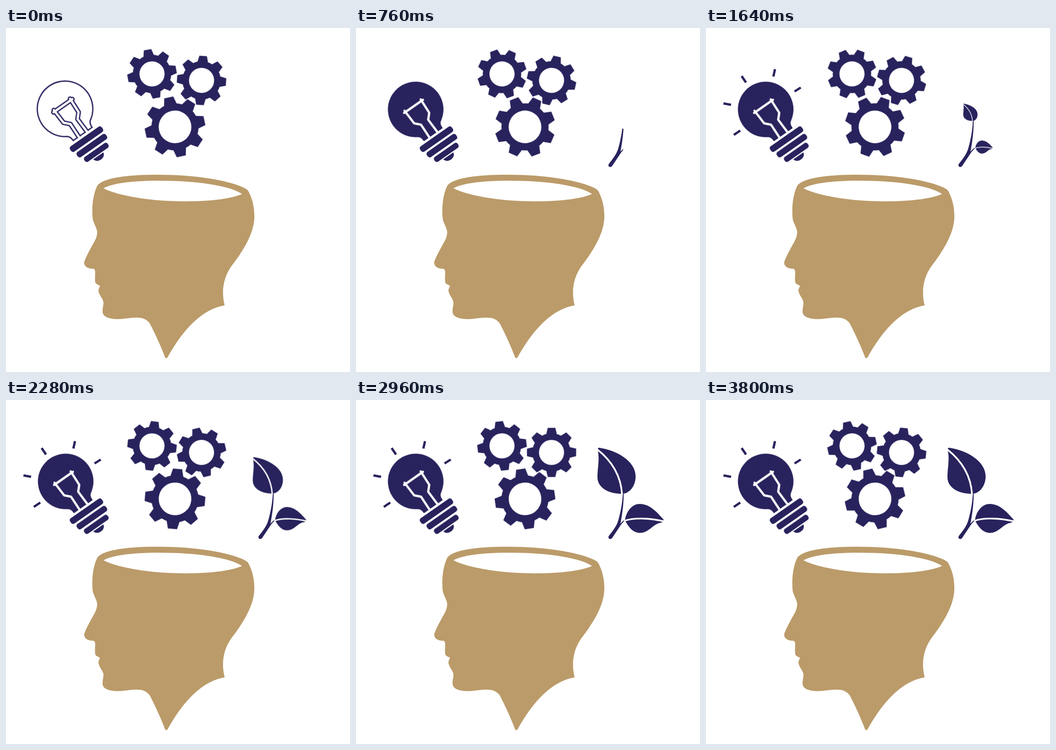
These frames come from a looping animation (748 by 748 pixels, 3840 ms). An HTML page without scripts:

```html
<!DOCTYPE html>
<html lang="en">
<head>
<meta charset="utf-8">
<title>Thinking head</title>
<style>
  @property --lit { syntax: "<number>"; inherits: true; initial-value: 0; }

  html, body { margin: 0; width: 100%; height: 100%; overflow: hidden; background: #fff; }
  svg { display: block; width: 100%; height: 100%; --navy: #28235d; --gold: #bb9b69; }

  .navy { fill: var(--navy); }
  .gold { fill: var(--gold); }
  .line { fill: none; stroke: var(--navy); }
  .white { fill: none; stroke: #fff; }

  .gear, .lit, .outline, .rays, .leaf, .draw {
    animation: 3840ms linear infinite;
  }

  .gear { animation-name: turn; animation-timing-function: steps(96); }
  .back { animation-direction: reverse; animation-timing-function: steps(96, start); }
  @keyframes turn { from { transform: rotate(0deg); } to { transform: rotate(180deg); } }

  .lit { animation-name: light; }
  .outline { animation-name: dim; }
  @keyframes light { 0%, 3.1% { opacity: 0; } 12.5%, 100% { opacity: 1; } }
  @keyframes dim { 0%, 3.1% { opacity: 1; } 12.5%, 100% { opacity: 0; } }

  /* rays switch on one after another */
  .rays { animation-name: rays; }
  .rays path { opacity: calc(var(--lit) - var(--i)); }
  @keyframes rays {
    0% { --lit: 0; }
    25% { --lit: 0; animation-timing-function: steps(5); }
    40.625%, 100% { --lit: 5; }
  }

  .draw { stroke-dasharray: 1 2; }
  .stem { animation-name: stem; }
  .twig { animation-name: twig; }
  @keyframes stem { 0% { stroke-dashoffset: 1; } 25%, 100% { stroke-dashoffset: 0; } }
  @keyframes twig { 0%, 20% { stroke-dashoffset: 1; } 25%, 100% { stroke-dashoffset: 0; } }

  .low { animation-name: low; transform-origin: 586px 260px; }
  .high { animation-name: high; transform-origin: 580px 201px; }
  @keyframes low { 0%, 21.3% { transform: scale(0); } 68.75%, 100% { transform: scale(1); } }
  @keyframes high {
    0%, 29.2% { transform: scale(0); }
    42.7% { transform: scale(.375); }
    59.4% { transform: scale(.79); }
    68.2%, 100% { transform: scale(1); }
  }
</style>
</head>
<body>
<svg viewBox="0 0 748 748">
  <defs>
    <path id="tooth" d="M-14 -49 L-10 -65.4 H10 L14 -49Z"/>
    <g id="pair"><use href="#tooth"/><use href="#tooth" transform="rotate(180)"/></g>
    <g id="cross"><use href="#pair"/><use href="#pair" transform="rotate(90)"/></g>
    <g id="gear" class="navy">
      <circle r="43.3" class="line" stroke-width="15.6"/>
      <use href="#cross"/>
      <use href="#cross" transform="rotate(45)"/>
    </g>
    <g id="small-gear" transform="scale(.817)">
      <use href="#gear"/>
      <circle r="36" class="line" stroke-width="5.2"/>
    </g>

    <path id="glass" d="M-25 67 C-25 60 -26 55 -31 52 A60.4 60.4 0 1 1 31 52 C26 55 25 60 25 67Z"/>
    <path id="filament" stroke-linecap="round" stroke-linejoin="round"
      d="M-10.5 69 L-9.5 34 L-20 23 L-21.5 -11.5 M10.5 69 L9.5 34 L20 23 L21.5 -11.5 M-25 -8 H25"/>

    <mask id="growth" maskUnits="userSpaceOnUse" x="530" y="180" width="80" height="130">
      <path class="white draw stem" pathLength="1" stroke-width="15"
        d="M547 305 C562 287 569 277 574 261 C580 240 581 217 581 194"/>
      <path class="white draw twig" pathLength="1" stroke-width="12" d="M573 271 L591 257"/>
    </mask>
  </defs>

  <!-- head -->
  <path class="gold" fill-rule="evenodd" d="M198 344 C204 333 233 319 330 319 C425 319 497 335 522 350
    C526 352 528 356 530 361 C537 376 540 392 540 410 C540 450 510 492 490 518
    C474 541 467 570 475.500 603 C428 611 386 653 350.500 717.500 H346.500 C338 695 325 666 313 643
    C307 634 298 630 288 630 C272 629 260 633 243 633 C225 633 210 628 210 617
    C210 607 212 603 212 597 C211 588 202 581 201 571 C201 566 204 564 204 560
    C199 558 195 556 194 553 C193 545 194 535 194 530 C193 525 192 523.500 189 523.500
    C178 523 170 519 170 510 C172 500 187 474 193 463 C197 456 199 447 198 441
    C195 430 190 423 188.500 415 C186 390 189 363 198 344Z
    M212 348.500 C228 338 275 332 332 332 C420 332 490 344 513 361
    C490 372 440 377 390 377 C300 377 235 361 212 348.500Z"/>

  <!-- gears -->
  <g transform="translate(317.5 99.8) rotate(-10.5)"><g class="gear"><use href="#small-gear"/></g></g>
  <g transform="translate(425.2 114) rotate(3.75)"><g class="gear back"><use href="#small-gear"/></g></g>
  <g transform="translate(367.5 215) rotate(-12)"><g class="gear"><use href="#gear"/></g></g>

  <!-- bulb -->
  <g class="outline" transform="translate(128.3 175.6) rotate(-35)">
    <use href="#glass" class="line" stroke-width="2.8"/>
    <use href="#filament" class="line" stroke-width="10.4"/>
    <use href="#filament" class="white" stroke-width="4.8"/>
    <path class="white" stroke-width="6" d="M-30 71.500 H30"/>
  </g>
  <g transform="translate(129.7 177) rotate(-35)">
    <g class="lit">
      <use href="#glass" class="navy"/>
      <use href="#filament" class="white" stroke-width="4.8"/>
    </g>
    <g class="navy">
      <rect x="-42" y="72" width="84" height="14" rx="5"/>
      <rect x="-37" y="90.5" width="77" height="13.500" rx="5"/>
      <rect x="-30" y="108.5" width="62" height="12.500" rx="5"/>
      <path d="M-13 123.500 H13.500 C12 136.500 -11 136.500 -13 123.500Z"/>
    </g>
  </g>
  <g class="rays line" stroke-width="5">
    <path style="--i:0" d="M192.500 138 L206 129.500"/>
    <path style="--i:1" d="M146.500 105.500 L150 89.500"/>
    <path style="--i:2" d="M77.500 104.500 L87 118.500"/>
    <path style="--i:3" d="M38 164 L54.500 167"/>
    <path style="--i:4" d="M60.500 232.500 L74.500 223"/>
  </g>

  <!-- plant -->
  <path class="navy" mask="url(#growth)" d="M549.500 296 C558 285 567 274 570.500 261 C577 238 580 217 580.500 196
    H581.800 C583 222 579 248 575 269 C579 264 584 260 588 259
    C583 263 577 269 573 276 L557 300 C553 305 547 301 549.500 296Z"/>
  <g class="leaf low">
    <path class="navy" d="M585 260 C589 239 602 226 617 226 C640 226 656 246 668 259
      C671 263 667 266 662 267 C645 270 637 289 617 289 C602 289 592 275 585 262Z"/>
    <path class="white" stroke-width="3.6" d="M583 263 C605 255 640 257 671 264"/>
  </g>
  <g class="leaf high">
    <path class="navy" d="M530 104 C565 109 608 132 608 166 C608 188 594 204 578 204
      C548 204 525 190 525 168 C525 148 530 130 526 111 C525 106 526 103 530 104Z"/>
    <path class="white" stroke-width="3.8" d="M524 107 C556 132 576 165 578.500 205"/>
  </g>
</svg>
</body>
</html>
```
